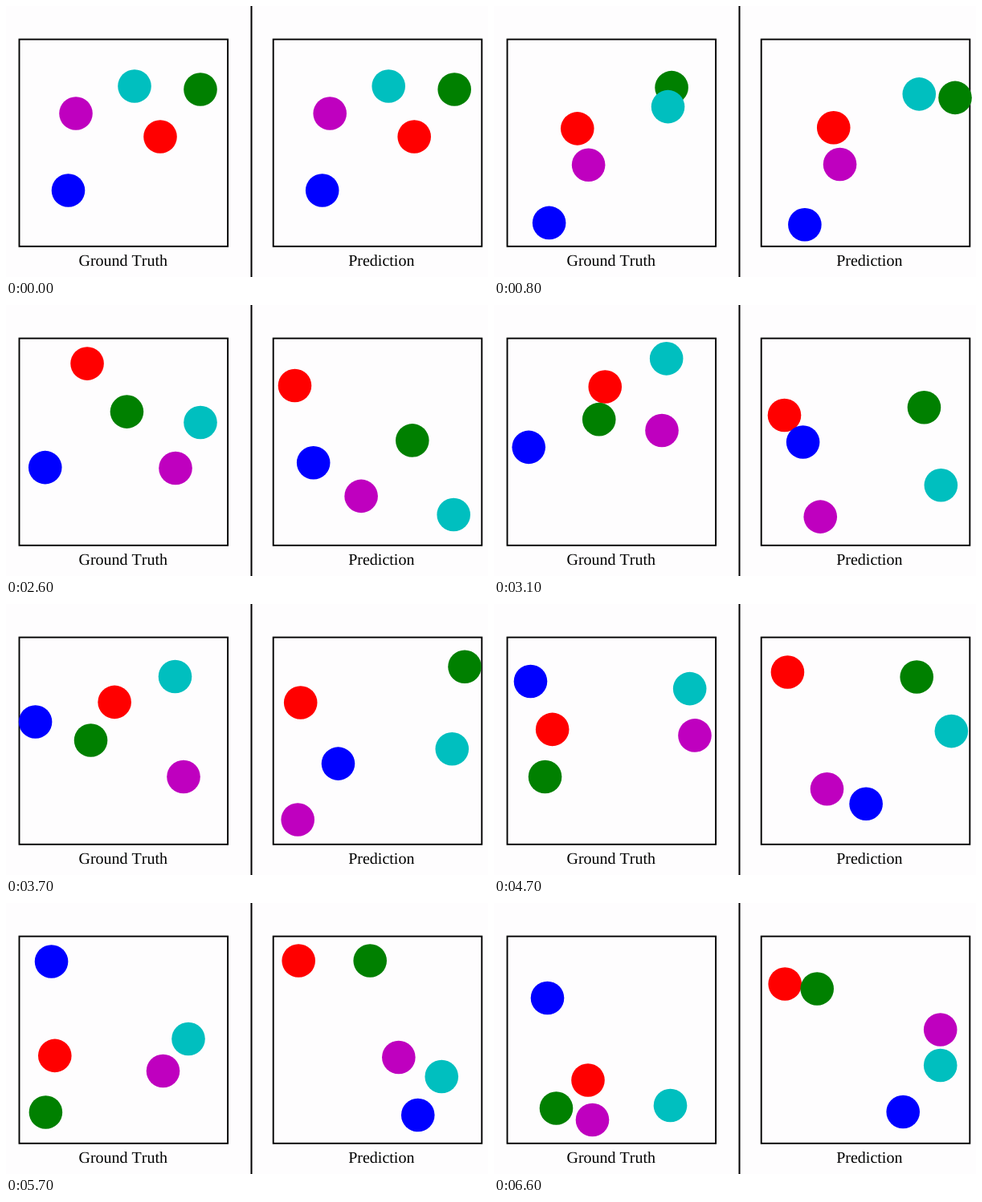
Animation, 600 px wide and 338 px high, one loop 6.7 s. Source, as an HTML page:

```html
<!DOCTYPE html>
<html lang="en">
<head>
<meta charset="utf-8">
<title>Bouncing balls: ground truth and prediction</title>
<style>
  html, body { margin: 0; width: 100%; height: 100%; overflow: hidden; background: #fefdfe; }
  svg { display: block; width: 100vw; height: 100vh; }
  text {
    font: 20px "Liberation Serif", "Times New Roman", serif;
    font-kerning: none;
    text-rendering: geometricPrecision;
  }
</style>
</head>
<body>
<svg viewBox="0 0 600 338">
  <path d="M305.5 0V338" stroke="#000" stroke-width="2"/>
  <g fill="none" stroke="#000" stroke-width="1.9">
    <rect x="16.5" y="41.6" width="259.6" height="258.2"/>
    <rect x="332.7" y="41.6" width="259.6" height="258.2"/>
  </g>
  <text x="90.5" y="324.3">Ground Truth</text>
  <text x="426.2" y="324.3">Prediction</text>
  <g id="truth"></g>
  <g id="prediction" transform="translate(316.2)"></g>
</svg>
<script>
const STEP = 100, STEPS = 67, RADIUS = 20.8;
// Limits for ball centres
const LEFT = 35.5, RIGHT = 259, TOP = 59.5, BOTTOM = 282;
const balls = [];

// Each hit is [seconds, x, y], where a ball meets another one. Between hits it
// flies straight; a point beyond a wall is reached by bouncing off that wall.
function ball(panel, color, ...hits) {
  const node = document.createElementNS('http://www.w3.org/2000/svg', 'circle');
  node.setAttribute('r', RADIUS);
  node.setAttribute('fill', color);
  document.getElementById(panel).append(node);
  balls.push({ node, hits });
}

function bounce(p, low, high) {
  const size = high - low;
  const lap = (((p - low) % (2 * size)) + 2 * size) % (2 * size);
  return low + size - Math.abs(size - lap);
}
const bounceX = x => bounce(x, LEFT, RIGHT);
const bounceY = y => bounce(y, TOP, BOTTOM);
const mix = (a, b, part) => a + (b - a) * part;

function place({ node, hits }, t) {
  const i = Math.max(1, hits.findIndex(hit => hit[0] >= t));
  const [t0, x0, y0] = hits[i - 1], [t1, x1, y1] = hits[i];
  const part = (t - t0) / (t1 - t0);
  node.setAttribute('cx', bounceX(mix(bounceX(x0), x1, part)));
  node.setAttribute('cy', bounceY(mix(bounceY(y0), y1, part)));
}

// Both panels begin alike
const red = ['red', [0, 192, 163], [.73, 109, 157]];
const green = ['#008000', [0, 242, 104], [.42, 236, 95]];
const cyan = ['#00bfbf', [0, 160, 100], [.42, 204, 64]];
const magenta = ['#bf00bf', [0, 87, 134], [.73, 114, 192]];
const blue = ['blue', [0, 77.5, 230]];

ball('truth', ...red, [3.07, -65, 18], [3.35, 157, 110.5], [6.6, -46, 221]);
ball('truth', ...green, [3.07, 132, 141.3], [6.5, -12, 297.5], [6.6, 77.5, 256]);
ball('truth', ...cyan, [2.6, 276, 417.5], [3.35, 201, 27], [3.7, 210.5, 90.5],
  [4.77, 246, 8], [5.7, 227, -50.5], [6.6, 219.5, 252.5]);
ball('truth', ...magenta, [2.6, 211, 360.5], [3.35, 208, 133], [3.7, 221, 215.5],
  [4.77, 252, 413], [5.7, 322.5, 209.5], [6.6, 122.5, 293.5]);
ball('truth', ...blue, [6.6, 4.5, 563.5]);

ball('prediction', ...red, [3.12, 25, -20], [3.7, 50.5, 123], [5.7, 48, 47], [6.6, 46, 101]);
ball('prediction', ...green, [2.32, 345, 192], [4.31, 291, 28], [4.7, 210, 91],
  [5.7, 137, 47], [6.6, 86, 107]);
ball('prediction', ...cyan, [1.7, 234.5, 218.5], [2.6, 241, 302.5], [4.31, 238, 136],
  [5.83, 297, 224], [6.6, 239.5, 202.5]);
ball('prediction', ...magenta, [1.7, 119, 269], [2.32, 146, 340], [3.7, 47, 295],
  [6.6, -168.5, 158]);
ball('prediction', ...blue, [1.7, 63, 321], [3.12, 68.5, 170], [5.83, 203, 306],
  [6.6, 193, 303.5]);

const start = performance.now();
function draw() {
  const step = Math.floor((performance.now() - start) / STEP) % STEPS;
  for (const b of balls) place(b, step * STEP / 1000);
  requestAnimationFrame(draw);
}
draw();
</script>
</body>
</html>
```
